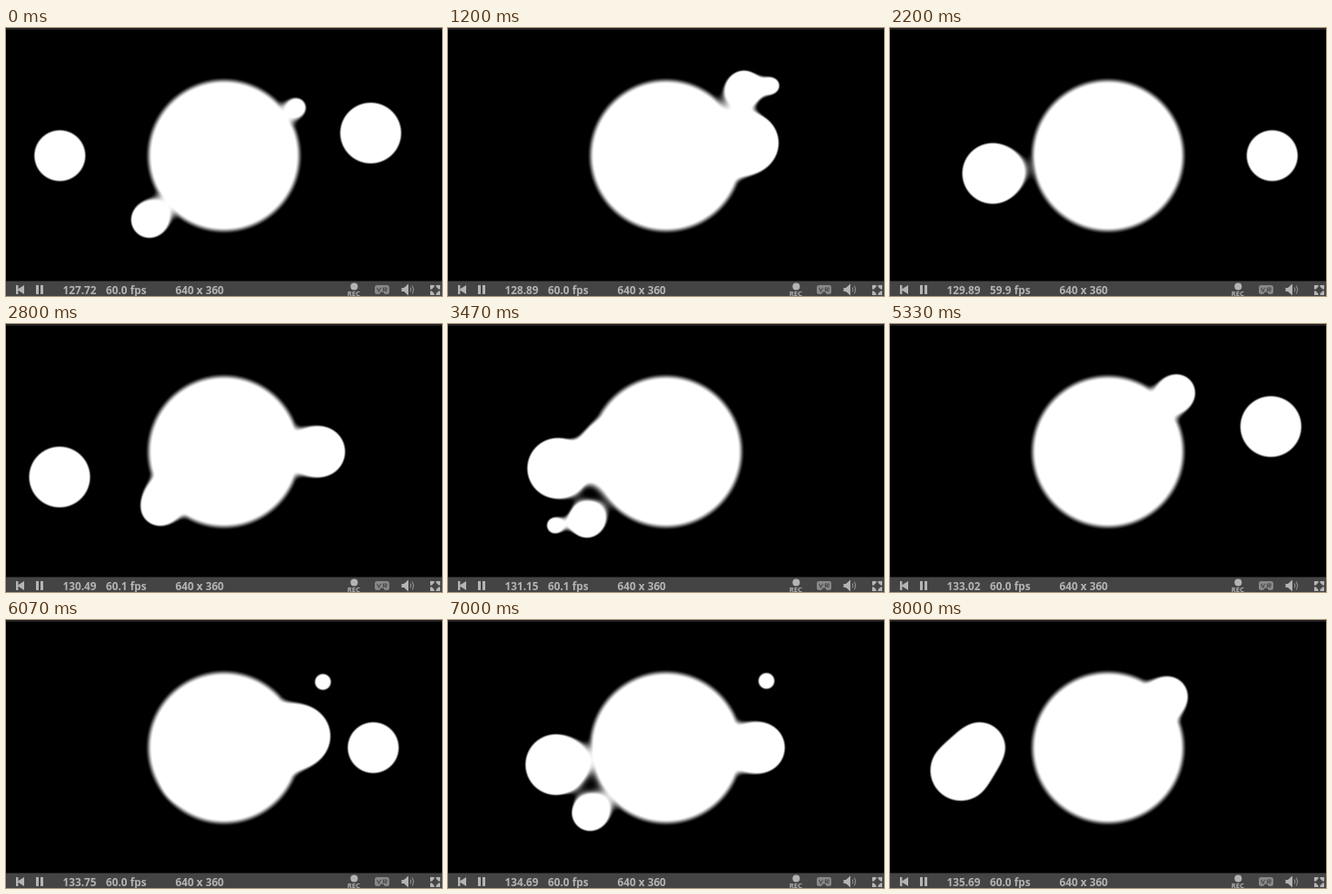
An HTML page with a canvas for the animation above (8070 ms loop, 480x296 px).

```html
<!DOCTYPE html>
<html lang="en">
<head>
<meta charset="utf-8">
<title>Metaballs</title>
<style>
  html, body { margin: 0; width: 100%; height: 100%; overflow: hidden; background: #000; }
  canvas, svg { position: absolute; left: 0; top: 0; display: block; }
  text { font: 700 11.8px "Open Sans", "Noto Sans", sans-serif; fill: #b4b4b4; }
  .rec { font-size: 7.6px; }
</style>
</head>
<body>
<canvas id="view" width="480" height="280"></canvas>
<svg width="480" height="296" viewBox="0 0 480 296">
  <rect width="480" height="2" fill="#202020"/>
  <rect y="279.5" width="480" height="16.5" fill="#444"/>
  <g fill="#b4b4b4">
    <path d="M11 284h2.4v4.2l6.6-4.2v10l-6.600-4.200v4.200h-2.400z"/>
    <path d="M33 284h3v10h-3zM38 284h3v10h-3z"/>
    <circle cx="383.300" cy="285.500" r="4"/>
    <path d="M435.500 287h2.500l5-4.500v13l-5-4.500h-2.500z"/>
    <path d="M445 286.500q2 2.500 0 5M447.300 284.500q3 4.500 0 9" fill="none" stroke="#999" stroke-width="1"/>
    <path d="M467 284h4.500v1.800l-2.700 2.700h-1.800zM478 284h-4.500v1.800l2.700 2.700h1.800zM467 295h4.500v-1.800l-2.700-2.700h-1.800zM478 295h-4.500v-1.800l2.700-2.700h1.800z"/>
  </g>
  <path d="M408.500 284h11q2.500 0 2.500 2.500v5q0 2.500-2.500 2.500h-2.500l-2-2.500h-2l-2 2.500h-2.500q-2.500 0-2.500-2.500v-5q0-2.500 2.500-2.500z" fill="#888"/>
  <path d="M408.500 287l2 4 2-4M415.500 291v-4h3.500v2h-3l3 2" fill="none" stroke="#4c4c4c" stroke-width="1.100"/>
  <text id="clock" x="62.500" y="294"></text>
  <text id="rate" x="110" y="294"></text>
  <text x="186.500" y="294">640 x 360</text>
  <text class="rec" x="375.800" y="296">REC</text>
</svg>
<script>
const LOOP = 8070, LAST_STEP = 120, STEPS_PER_SECOND = 15;
const START_TIME = 127.72, BASE_TIME = 127.686;
const WIDTH = 480, HEIGHT = 280, CX = 240, CY = 141;

// The large ball has a shallower distance slope, which softens its edge.
const CORE = { r: 83, slope: 0.36, blend: 14 };
const BALL_BLEND = 19, EDGE = 1.4;
const BALLS = [
  { r: 8.7, dx: -126, dy: 84, speed: 1.1 },
  { r: 20, dx: 97, dy: -83.5, speed: 1.8 },
  { r: 33.5, dx: -181, dy: 28, speed: 1.3 },
  { r: 28, dx: 181, dy: 0, speed: 1.5 }
];

const ctx = document.getElementById("view").getContext("2d");
const image = ctx.createImageData(WIDTH, HEIGHT);
const pixels = new Uint32Array(image.data.buffer);
const clock = document.getElementById("clock");
const rate = document.getElementById("rate");

function smoothMin(a, b, k) {
  const h = Math.max(k - Math.abs(a - b), 0);
  return Math.min(a, b) - h * h / (4 * k);
}

function distance(x, y, r) {
  return Math.sqrt(x * x + y * y) - r;
}

function drawBalls(time) {
  const balls = BALLS.map(({ r, dx, dy, speed }) => {
    const swing = Math.cos(speed * time);
    return { r, x: CX + dx * swing, y: CY + dy * swing };
  });
  let i = 0;
  for (let py = 0.5; py < HEIGHT; py++) {
    for (let px = 0.5; px < WIDTH; px++) {
      let d = 1e4;
      for (const b of balls) {
        d = smoothMin(d, distance(px - b.x, py - b.y, b.r), BALL_BLEND);
      }
      const core = CORE.slope * distance(px - CX, py - CY, CORE.r);
      d = smoothMin(d, core, CORE.blend);
      const u = Math.min(1, Math.max(0, (EDGE - d) / (2 * EDGE)));
      const level = Math.round(255 * u * u * (3 - 2 * u));
      pixels[i++] = 0xff000000 | level * 0x010101;
    }
  }
  ctx.putImageData(image, 0, 0);
}

function frameRate(seconds) {
  if (seconds < 1.7) return "60.0";
  if (seconds < 2.7) return "59.9";
  return seconds < 3.7 ? "60.1" : "60.0";
}

const began = performance.now();
let shown = -1;

function update() {
  const ms = (performance.now() - began) % LOOP;
  const step = Math.min(LAST_STEP, Math.floor(ms * STEPS_PER_SECOND / 1000 + 0.06));
  if (step !== shown) {
    shown = step;
    const seconds = step / STEPS_PER_SECOND;
    const time = Math.max(START_TIME, BASE_TIME + seconds);
    drawBalls(time);
    clock.textContent = time.toFixed(2);
    rate.textContent = frameRate(seconds) + " fps";
  }
  requestAnimationFrame(update);
}
update();
</script>
</body>
</html>
```
